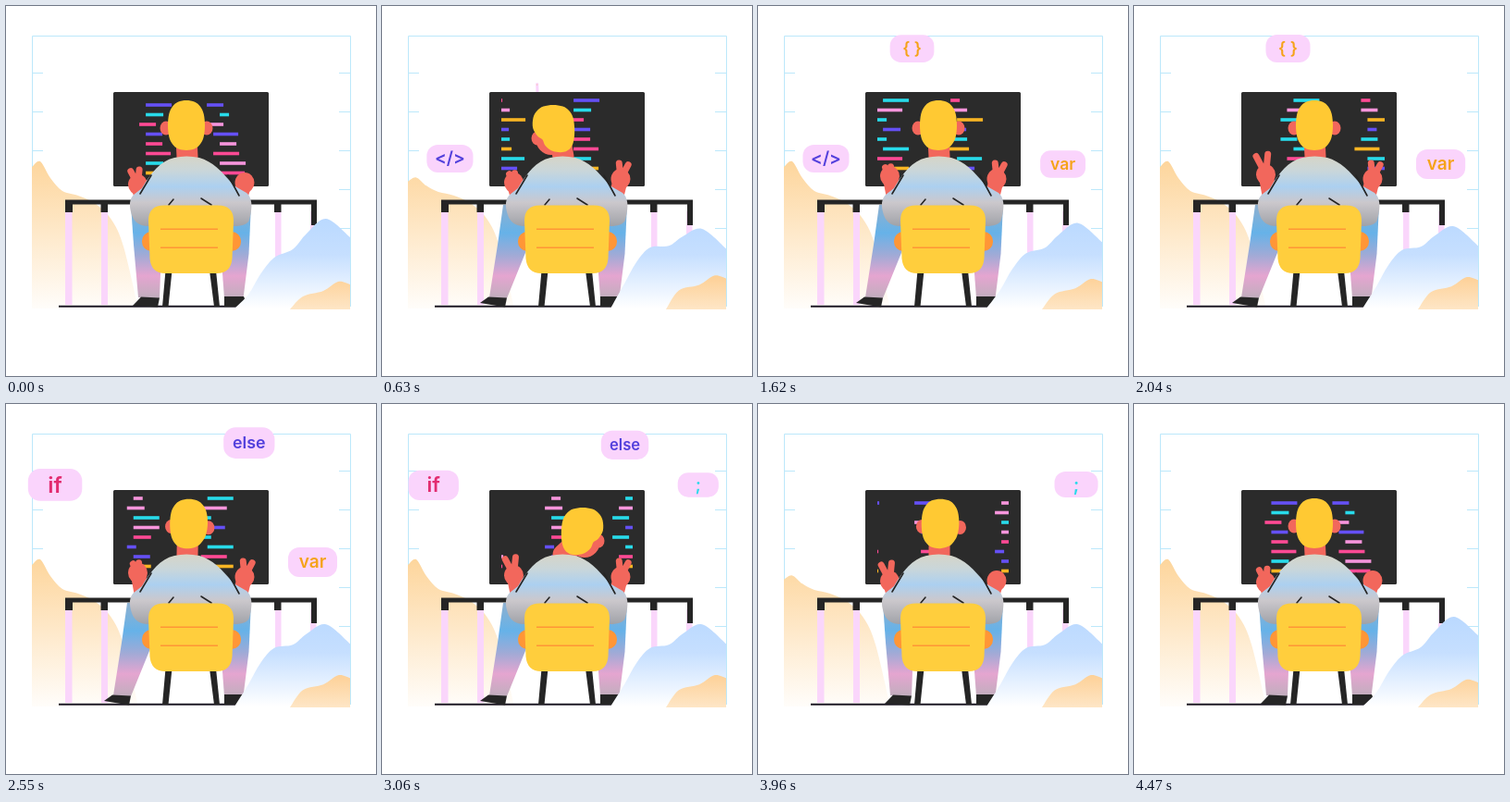
Recreate the animation shown at these times as an HTML page. Size 400 by 400 pixels, loop 4.5 s.

```html
<!DOCTYPE html>
<html lang="en">
<head>
<meta charset="utf-8">
<title>Coder at a desk</title>
<style>
html, body { margin: 0; width: 100%; height: 100%; overflow: hidden; background: #fff; }
svg { display: block; width: 100vw; height: 100vh; }
text { font-family: Inter, "Open Sans", sans-serif; font-weight: 600; text-anchor: middle; }
.line { fill: none; stroke: #252525; stroke-width: 1.6; stroke-linecap: round; }
.skin { fill: #f2675c; stroke: #f2675c; stroke-linecap: round; stroke-width: 0; }
</style>
</head>
<body>
<svg viewBox="0 0 400 400">
  <defs>
    <linearGradient id="sand" gradientUnits="userSpaceOnUse" x1="0" y1="166" x2="0" y2="327">
      <stop stop-color="#fdd59b"/><stop offset="1" stop-color="#fffdfa"/>
    </linearGradient>
    <linearGradient id="sky" gradientUnits="userSpaceOnUse" x1="0" y1="230" x2="0" y2="327">
      <stop stop-color="#bad9ff"/><stop offset=".4" stop-color="#c6dfff"/><stop offset="1" stop-color="#fff"/>
    </linearGradient>
    <linearGradient id="dune" gradientUnits="userSpaceOnUse" x1="0" y1="292" x2="0" y2="328">
      <stop stop-color="#fdd096"/><stop offset="1" stop-color="#fee6c6"/>
    </linearGradient>
    <linearGradient id="shirt" gradientUnits="userSpaceOnUse" x1="0" y1="163" x2="0" y2="240">
      <stop stop-color="#d6d5c8"/><stop offset=".2" stop-color="#c9d6da"/><stop offset=".42" stop-color="#acd0f0"/>
      <stop offset=".64" stop-color="#cbc8cc"/><stop offset="1" stop-color="#9d9fa5"/>
    </linearGradient>
    <linearGradient id="jeans" gradientUnits="userSpaceOnUse" x1="0" y1="215" x2="0" y2="316">
      <stop stop-color="#8fb0cf"/><stop offset=".3" stop-color="#66b2e8"/>
      <stop offset=".54" stop-color="#a1aad6"/><stop offset=".76" stop-color="#e5a5d0"/>
      <stop offset="1" stop-color="#c0aebd"/>
    </linearGradient>
    <clipPath id="screen"><rect x="129" y="99" width="142" height="86"/></clipPath>
  </defs>

  <path d="M28.500 325V32.500H372.500V325M28 72.500h12M28 114.500h12M28 156.500h12M360 72.500h12M360 114.500h12M360 156.500h12M360 198.500h12M360 240.500h12"
    fill="none" stroke="#bce8fb"/>
  <path id="leftHill" fill="url(#sand)"/>
  <path d="M64 222h7.500v101H64zM103 222h7v101h-7zM291 222h6.500v101H291zM329 222h6.500v101H329z" fill="#fad6fb"/>
  <path d="M64 209.500H336V237h-6V214.500H297.500V223H290v-8.500H110V223h-7.500v-8.500H72V223H64z" fill="#252525"/>
  <g id="trails" stroke="#fad4fc" stroke-width="3"></g>
  <rect x="116" y="93" width="168" height="102" rx="1.500" fill="#2b2b2b"/>
  <g id="code" clip-path="url(#screen)"></g>

  <path d="M57 324.800H250" stroke="#1c1824" stroke-width="2"/>
  <path id="leftLeg" fill="url(#jeans)"/>
  <path d="M265 214L262.500 268L256.500 316H236L232 262V215Z" fill="url(#jeans)"/>
  <path id="leftFoot" fill="#252525"/>
  <path d="M236 314H257Q259 317 258 325H236Z" fill="#252525"/>
  <path d="M172.500 286h7l-4 39h-6.500zM220 286h7l4 39h-6z" fill="#252525"/>

  <path id="neck" class="skin" style="stroke-width:23"/>
  <ellipse id="face" class="skin" rx="17" ry="18"/>
  <ellipse id="earL" class="skin" rx="6.500" ry="7.500"/>
  <ellipse id="earR" class="skin" rx="6.500" ry="7.500"/>
  <path id="hair" fill="#ffc933"/>
  <g id="hands" class="skin"></g>

  <path d="M182 164Q195 161 209 164C223 168 233 178 246 194L260 202Q269 209 263 231Q261 238 246 238H154Q140 238 136 226Q131 211 138 204L147 197C157 180 166 168 182 164Z" fill="url(#shirt)"/>
  <path class="line" d="M157 183L145 203M240 183L252 205M181 209L176 215M211 208L222 215"/>
  <rect x="147" y="244" width="107" height="21" rx="10" fill="#ff9636"/>
  <path d="M171 215.500H229Q246 215.500 246 232L244.500 273Q243 289 228 289H172Q157 289 155.500 273L154 232Q154 215.500 171 215.500Z" fill="#ffce3d"/>
  <path d="M167 241.200H229M167 261.200H229" stroke="#ff9636" stroke-width="1.500"/>

  <path id="blueHill" fill="url(#sky)"/>
  <path id="rightDune" fill="url(#dune)"/>
  <g id="bubbles"></g>
</svg>
<script>
const LOOP = 4500;
const { sin, cos, abs, sign, exp, min, max, PI } = Math;

const $ = id => document.getElementById(id);
const lerp = (a, b, k) => a + (b - a) * k;
const set = (el, attrs) => { for (const k in attrs) el.setAttribute(k, attrs[k]); return el; };
const add = (parent, tag, attrs = {}) =>
  set(parent.appendChild(document.createElementNS('http://www.w3.org/2000/svg', tag)), attrs);

// Eased 0 to 1 around a moment, and a pulse between two moments
function rise(t, at, ramp = 400) {
  const u = max(0, min(1, (t - at) / ramp + .5));
  return u * u * (3 - 2 * u);
}
const pulse = (t, from, to) => rise(t, from) - rise(t, to);

// Smooth curve through points (Catmull-Rom)
function curve(pts, closed) {
  const n = pts.length;
  const at = i => closed ? pts[(i + n) % n] : pts[max(0, min(n - 1, i))];
  let d = 'M' + pts[0];
  for (let i = 0; i < (closed ? n : n - 1); i++) {
    const [a, b, c, e] = [at(i - 1), at(i), at(i + 1), at(i + 2)];
    d += `C${b[0] + (c[0] - a[0]) / 6} ${b[1] + (c[1] - a[1]) / 6} ` +
         `${c[0] - (e[0] - b[0]) / 6} ${c[1] - (e[1] - b[1]) / 6} ${c[0]} ${c[1]}`;
  }
  return d;
}

// Hills: a resting ridge plus a swelling ripple
const SAND = [[28, 174], [37, 168], [48, 186], [61, 200], [78, 205], [97, 214], [114, 231], [127, 260], [143, 327]];
const SKY = [[247, 327], [262, 312], [275, 290], [290, 272], [310, 263], [325, 246], [346, 230], [372, 250]];
const ripple = (ridge, fn) => curve(ridge.map(([x, y]) => [x, y + fn(x)]));

function drawHills(t) {
  const sand = pulse(t, 350, 1100) + pulse(t, 3600, 4220);
  const sky = pulse(t, 350, 950) + .75 * pulse(t, 1600, 4200);
  set($('leftHill'), { d: ripple(SAND, x => 18 * sand * exp(-(((x - 34) / 16) ** 2))) + 'H28Z' });
  set($('blueHill'), { d: ripple(SKY, x => x < 250 ? 0 : 13 * sky * sin((x - 318) / 28)) + 'V328H247Z' });
  const y = 298 - 6.5 * sky;
  set($('rightDune'), { d: curve([[307, 328], [321, y + 16], [343, y + 10], [359, y], [372, y + 3]]) + 'V328Z' });
}

// Head: turn runs from -1 (left) to 1 (right)
function drawHead(turn) {
  const k = abs(turn), dir = turn < 0 ? -1 : 1;
  const x = 195 + 16 * turn + 6 * turn * turn, y = 129 + 2.5 * turn + 5.5 * turn * turn;
  const hair = Array.from({ length: 16 }, (_, i) => {
    const a = i * PI / 8;
    const lobe = at => max(0, cos(a - at)) ** 6;
    const r = 1 + k * (.12 * lobe(.7 * PI) - .34 * lobe(.24 * PI));
    const round = v => sign(v) * abs(v) ** .82;
    return [x + dir * r * round(cos(a)) * lerp(20, 23, k), y + r * round(sin(a)) * lerp(27, 25, k)];
  });
  set($('hair'), { d: curve(hair, true) });
  set($('neck'), { d: `M${x - dir * 8 * k} ${y + 14}L196 163` });
  set($('face'), { cx: x + dir * 2 * k, cy: y + lerp(4, 11, k) });
  const near = { cx: x + dir * lerp(22, 17, k), cy: y + lerp(3, 11, k) };
  const far = { cx: x - dir * lerp(22, 4, k), cy: y + 3 };
  set($('earL'), dir < 0 ? near : far);
  set($('earR'), dir < 0 ? far : near);
}

const hands = [-1, 1].map(dir => {
  const g = $('hands');
  return {
    dir,
    arm: add(g, 'path', { 'stroke-width': 16 }),
    fingers: add(g, 'path', { 'stroke-width': 7, fill: 'none' }),
    fist: add(g, 'ellipse', { rx: 10.5, ry: 11 })
  };
});
function drawHand({ dir, arm, fingers, fist }, x, y, len) {
  const tip = (dx, dy) => `M${x} ${y}l${dir * dx * len} ${-dy * len}`;
  set(arm, { d: `M${x} ${y}L${200 + dir * 53} 207` });
  set(fingers, { d: tip(.48, .9) + tip(-.1, 1) });
  set(fist, { cx: x, cy: y });
}

function drawLeg(s) {
  const heel = 166 - 31 * s, toe = 137 - 31 * s;
  set($('leftLeg'), {
    d: `M${135 - 4 * s} 215L${138 - 13 * s} 258L${143 - 27 * s} 315L${heel} 316L${168 - 11 * s} 262V215Z`
  });
  set($('leftFoot'), { d: `M${toe} ${324 - 3 * s}L${toe + 9} 314.500L${heel} 315.500L${heel - 2} 325.500Z` });
}

// Scrolling code with random line colour, width and indent
const INK = { violet: '#6550f5', pink: '#ff4a95', amber: '#f8b523', cyan: '#28dbea', lilac: '#f795dc' };
const PITCH = 80, COLUMNS = 5, ROWS = 9;
let seed = 11;
const random = () => (seed = seed * 16807 % 2147483647) / 2147483647;
const pick = list => list[Math.floor(random() * list.length)];
const lines = Array.from({ length: COLUMNS * ROWS }, () => ({
  fill: pick([INK.violet, INK.pink, INK.amber, INK.cyan, INK.violet, INK.pink, INK.lilac]),
  width: pick([10, 18, 19, 27, 28]),
  indent: pick([0, 0, 0, 0, 7, 14])
}));
const bars = [];
for (let c = -COLUMNS; c < 3; c++)
  for (let r = -1; r < ROWS - 1; r++) {
    const { fill, width, indent } = lines[(c + COLUMNS) % COLUMNS * ROWS + r + 1];
    bars.push({ el: add($('code'), 'rect', { width, height: 3.6, fill }), r, x: 151 + c * PITCH - indent });
  }
function drawCode(t, top) {
  const shift = t / LOOP * COLUMNS * PITCH;
  for (const b of bars) set(b.el, { x: b.x + shift, y: top + b.r * 10.5 - 1.8 });
}

// Speech bubbles spring from the monitor
const LIFE = 1600;
const bubble = (label, fill, size, start, from, to, w, h) => {
  const g = add($('bubbles'), 'g');
  add(g, 'rect', { x: -w / 2, y: -h / 2, width: w, height: h, rx: 12, fill: '#fad4fc' });
  add(g, 'text', { y: size * .34, 'font-size': size, fill }).textContent = label;
  return { g, trail: add($('trails'), 'line'), start, from, to };
};
const bubbles = [
  bubble('</>', '#5340dc', 19, 240, [116, 165], [73.5, 165], 50, 30),
  bubble('{ }', '#f5a31a', 18, 620, [168, 93], [166.5, 46], 48, 30),
  bubble('var', '#f5a31a', 19, 1150, [291, 171], [331.5, 171], 53, 32),
  bubble('if', '#e22c70', 22, 2200, [116, 100], [56, 88], 54, 32),
  bubble('else', '#5340dc', 16.5, 2200, [256, 93], [262.5, 44.5], 51, 31),
  bubble(';', INK.cyan, 20, 2620, [284, 100], [344, 87], 47, 28)
];
function drawBubbles(t) {
  for (const { g, trail, start, from, to } of bubbles) {
    const age = (t - start) / 1000;
    const out = min(1, (start + LIFE - t) / 150);
    const on = age > 0 && out > 0;
    g.style.display = on ? '' : 'none';
    trail.style.display = on && age < .16 ? '' : 'none';
    if (!on) continue;
    const spring = 1 - exp(-5 * age) * cos(12 * age);
    const go = spring ** .6;
    const x = lerp(from[0], to[0], go), y = lerp(from[1], to[1], go);
    set(g, { transform: `translate(${x} ${y}) scale(${spring * out})` });
    const tail = max(0, (age - .06) * 10);
    set(trail, { x1: lerp(from[0], x, tail), y1: lerp(from[1], y, tail), x2: x, y2: y });
  }
}

function draw(now) {
  const t = now % LOOP, turnOfLoop = 2 * PI * t / LOOP;
  const splay = pulse(t, 350, 3600);
  drawHills(t);
  drawHead(pulse(t, 2650, 3850) - pulse(t, 350, 1180));
  drawHand(hands[0], 142.5, 187.5 + 5.5 * cos(turnOfLoop), 16 + 6 * sin(5 * turnOfLoop));
  drawHand(hands[1], 258, 191 - 4 * splay, 4 + 13 * splay);
  drawLeg(splay);
  drawCode(t, 107 - 5 * splay);
  drawBubbles(t);
}
const begin = performance.now();
function tick() {
  draw(performance.now() - begin);
  requestAnimationFrame(tick);
}
tick();
</script>
</body>
</html>
```
